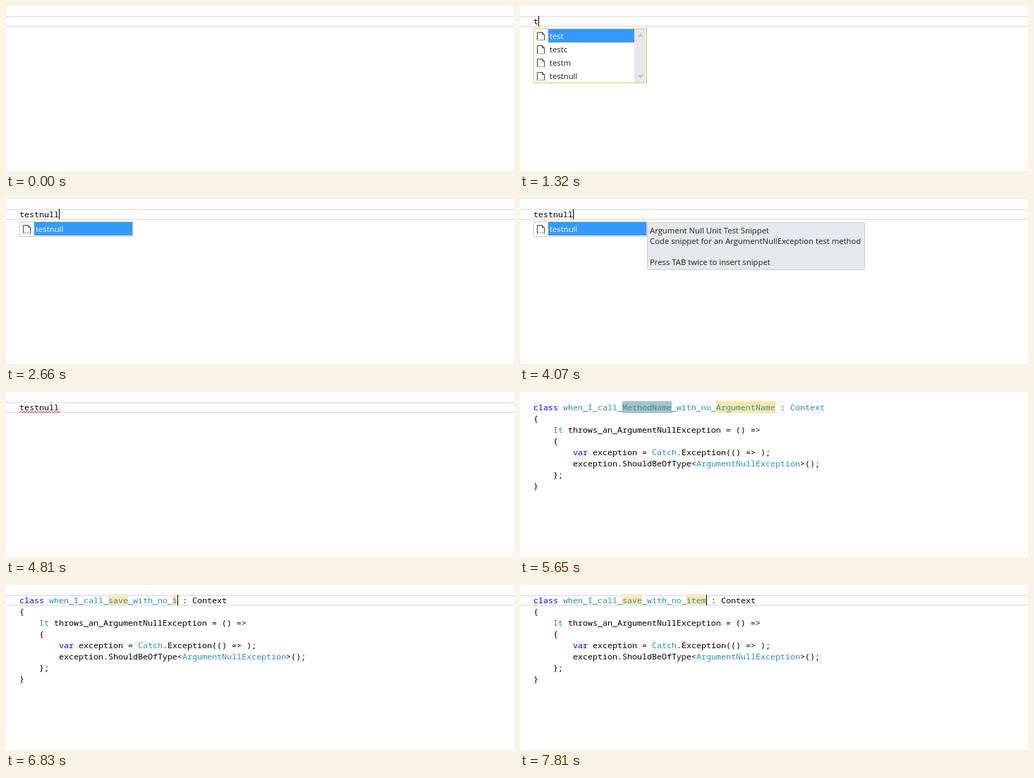
These frames come from a looping animation (720x235 px, 7.99 s). An HTML page:

```html
<!DOCTYPE html>
<html lang="en">
<head>
<meta charset="utf-8">
<title>Code snippet demo</title>
<style>
html, body { margin: 0; width: 100%; height: 100%; overflow: hidden; background: #fff; }
svg { display: block; }
text { white-space: pre; }
.code { font: 11.667px "Noto Sans Mono", "DejaVu Sans Mono", monospace; }
.ui { font: 11.32px "Open Sans", "Noto Sans", sans-serif; }
</style>
</head>
<body>
<svg id="stage" width="720" height="235" viewBox="0 0 720 235"></svg>
<script>
const LOOP = 7990;
const LEFT = 19, CHAR = 7, LINE = 16, BASE = 26;
const BLACK = '#000', BLUE = '#0000ff', TEAL = '#2b91af';
const FIELD = '#fde8a6', SELECTED = '#a6c4c8';
const stage = document.getElementById('stage');

const TIPS = {
  test: [196, 'Unit Test Snippet', 'Code snippet for a unit test method'],
  testnull: [309, 'Argument Null Unit Test Snippet',
    'Code snippet for an ArgumentNullException test method']
};

// Each step changes some of the state; the rest carries over.
const STEPS = [
  [0, { typed: '', caret: false, list: null, tip: null, squiggle: false, code: false }],
  [430, { caret: true }],
  [960, { caret: false }],
  [1200, { typed: 't', caret: true }],
  [1280, { list: ['test', 'testc', 'testm', 'testnull'] }],
  [1360, { typed: 'te' }],
  [1440, { typed: 'tes' }],
  [1600, { typed: 'test' }],
  [2020, { caret: false, tip: 'test' }],
  [2070, { typed: 'testn', caret: true, tip: null }],
  [2120, { list: ['testnull'] }],
  [2380, { typed: 'testnu' }],
  [2540, { typed: 'testnul' }],
  [2660, { typed: 'testnull' }],
  [2780, { tip: 'testnull' }],
  [3050, { caret: false }],
  [3380, { caret: true }],
  [3570, { caret: false }],
  [4070, { caret: true }],
  [4470, { list: null, tip: null }],
  [4630, { caret: false }],
  [4810, { squiggle: true }],
  [5040, { code: true, squiggle: false, method: 'MethodName', arg: 'ArgumentName',
           active: 'method', selecting: true, types: false, base: BLACK }],
  [5270, { types: true }],
  [5650, { base: TEAL }],
  [5760, { method: 's', selecting: false, caret: true, base: BLACK }],
  [5910, { method: 'sa' }],
  [6100, { method: 'sav' }],
  [6280, { method: 'save' }],
  [6460, { active: 'arg', selecting: true, caret: false, base: TEAL }],
  [6720, { arg: 'i', selecting: false, caret: true }],
  [6830, { base: BLACK }],
  [7010, { arg: 'it' }],
  [7200, { arg: 'ite' }],
  [7440, { base: TEAL }],
  [7770, { arg: 'item' }],
  [7810, { base: BLACK }]
];

const states = [];
STEPS.forEach(([, change], i) => states.push({ ...states[i - 1], ...change }));

const colX = col => LEFT + col * CHAR;

const rect = (x, y, w, h, fill, extra = '') =>
  `<rect x="${x}" y="${y}" width="${w}" height="${h}" fill="${fill}" ${extra}/>`;

const path = (d, stroke, extra = '') =>
  `<path d="${d}" fill="none" stroke="${stroke}" ${extra}/>`;

function label(str, x, y, kind, fill) {
  const safe = str.replace(/&/g, '&amp;').replace(/</g, '&lt;').replace(/>/g, '&gt;');
  return `<text class="${kind}" x="${x}" y="${y}" fill="${fill}">${safe}</text>`;
}

// A row of code made of [text, colour] parts on the character grid.
function row(line, col, ...parts) {
  let out = '';
  for (const [str, fill = BLACK] of parts) {
    out += label(str, colX(col), BASE + line * LINE, 'code', fill);
    col += str.length;
  }
  return out;
}

const lineFrame = () => rect(0, 14, 720, 2, '#e8e8f1') + rect(0, 28, 720, 2, '#e8e8f1');

const caret = col => rect(colX(col), 14, 1, 15, BLACK);

function icon(y) {
  return path(`M24.5 ${y + 11.5}V${y + .5}H31.5L34.5 ${y + 3.5}V${y + 11.5}`, '#424242') +
    path(`M31.5 ${y + .5}V${y + 3.5}H34.5`, '#424242') +
    path(`M24 ${y + 11.5}H35`, '#424242', 'stroke-dasharray="1 1"');
}

function popup(items) {
  const many = items.length > 1;
  const h = many ? 78 : 22;
  let out = rect(19.5, 32.5, 160, h - 1, '#fff', `stroke="${many ? '#e5c365' : '#cccedb'}"`);
  out += rect(19, 32, 161, 1, '#e5c365');
  out += rect(40, 33, many ? 122 : 139, 19, '#3399ff');
  if (many) {
    out += rect(162, 33, 17, 76, '#e8e8ec');
    out += '<path d="M166 44l4.500-5 4.500 5zM166 98l4.500 5 4.500-5z" fill="#c6c7cf"/>';
  }
  items.forEach((name, i) => {
    out += icon(37 + i * 19) + label(name, 42, 47 + i * 19, 'ui', i ? '#1e1e1e' : '#fff');
  });
  return out;
}

function tooltip([w, title, info]) {
  const say = (str, y) => label(str, 184, y, 'ui', '#1e1e1e');
  return rect(180.5, 33.5, w - 1, 67, '#e7e8ec', 'rx="1.500" stroke="#cccedb"') +
    say(title, 49) + say(info, 64) + say('Press TAB twice to insert snippet', 94);
}

function squiggle() {
  let d = 'M19 29.500';
  for (let x = 21, up = true; x <= 77; x += 2, up = !up) d += `L${x} ${up ? 27.5 : 29.5}`;
  return path(d, '#ff0000');
}

function drawTyping(s) {
  return lineFrame() + row(0, 0, [s.typed]) +
    (s.squiggle ? squiggle() : '') +
    (s.caret ? caret(s.typed.length) : '') +
    (s.list ? popup(s.list) : '') +
    (s.tip ? tooltip(TIPS[s.tip]) : '');
}

function drawCode(s) {
  const type = s.types ? TEAL : BLACK;
  const start = 'class when_I_call_'.length;
  const argCol = start + s.method.length + '_with_no_'.length;
  const field = (key, col) => rect(colX(col), 13, s[key].length * CHAR, 17,
    s.selecting && s.active === key ? SELECTED : FIELD);
  const end = s.active === 'method' ? start + s.method.length : argCol + s.arg.length;
  return field('method', start) + field('arg', argCol) +
    (s.selecting ? '' : lineFrame()) +
    row(0, 0, ['class ', BLUE], [`when_I_call_${s.method}_with_no_${s.arg}`, type],
      [' : '], ['Context', s.base]) +
    row(1, 0, ['{']) +
    row(2, 4, ['It', type], [' throws_an_ArgumentNullException = () =>']) +
    row(3, 4, ['{']) +
    row(4, 8, ['var', BLUE], [' exception = '], ['Catch', type], ['.Exception(() => );']) +
    row(5, 8, ['exception.ShouldBeOfType<'], ['ArgumentNullException', type], ['>();']) +
    row(6, 4, ['};']) +
    row(7, 0, ['}']) +
    (s.caret ? caret(end) : '');
}

let shown = -1;
function render(time) {
  let i = STEPS.length - 1;
  while (STEPS[i][0] > time) i--;
  if (i === shown) return;
  shown = i;
  const s = states[i];
  stage.innerHTML = s.code ? drawCode(s) : drawTyping(s);
}

const began = performance.now();
function tick() {
  render((performance.now() - began) % LOOP);
  requestAnimationFrame(tick);
}
tick();
</script>
</body>
</html>
```
